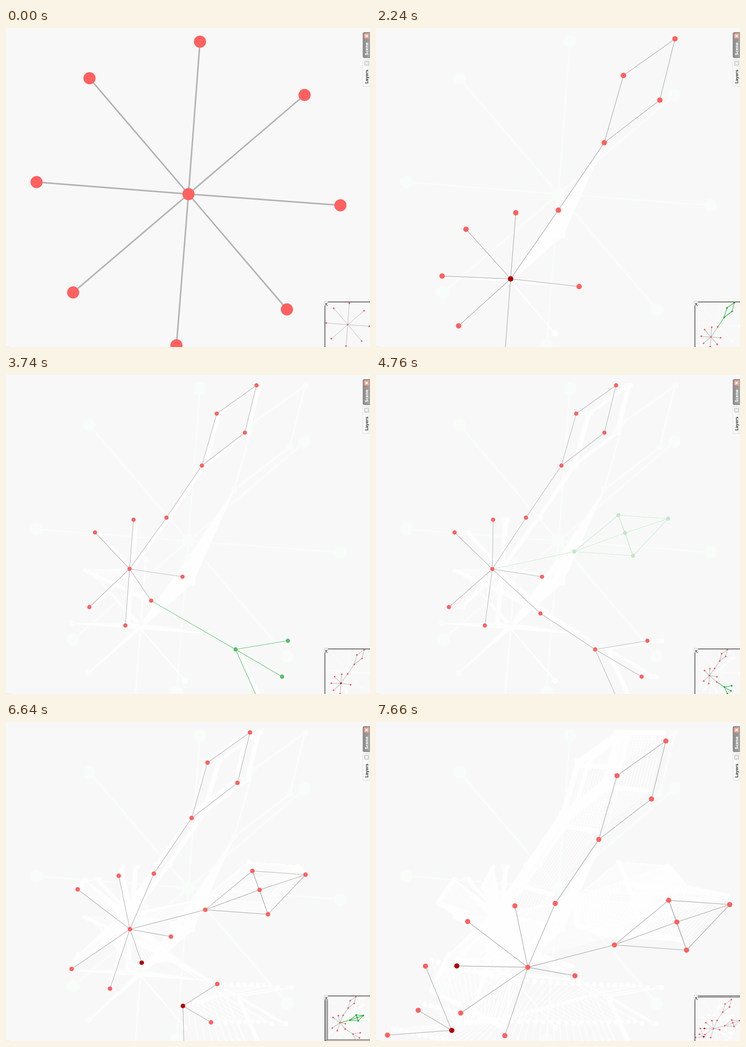
Animation, 799 px wide and 701 px high, one loop 8380 ms. Source, as an HTML page with a canvas:

```html
<!DOCTYPE html>
<html lang="en">
<head>
<meta charset="utf-8">
<title>Graph rewriting</title>
<style>
  html, body { margin: 0; width: 100%; height: 100%; overflow: hidden; background: #f8f8f8; }
  canvas { position: absolute; left: 0; top: 0; }
  .tab {
    position: absolute; left: 783px; width: 16px; box-sizing: border-box;
    border: 1px solid #ddd; border-right: 0; border-radius: 4px 0 0 4px;
    background: linear-gradient(90deg, #fff, #f0f0f0);
    font: bold 8.3px "DejaVu Sans", sans-serif; color: #444;
  }
  .tab.on { border-color: #8a8a8a; background: linear-gradient(90deg, #8c8c8c, #a4a4a4); color: #fff; }
  .tab span {
    position: absolute; left: 8px; white-space: nowrap; line-height: 10px;
    transform: translate(-50%, -50%) rotate(-90deg);
  }
  .tab svg { position: absolute; left: 2px; top: 2px; }
</style>
</head>
<body>
<canvas id="stage" width="799" height="701"></canvas>
<div class="tab on" style="top:9px;height:57px">
  <svg width="11" height="11"><rect width="11" height="11" rx="2" fill="#f2a08a"/><path d="M3 3l5 5M8 3l-5 5" stroke="#fff" stroke-width="1.8"/></svg>
  <span style="top:36px">Scene</span>
</div>
<div class="tab" style="top:69px;height:60px">
  <svg width="11" height="11"><rect width="11" height="11" rx="2" fill="#d4d4d4"/><path d="M3 3l5 5M8 3l-5 5" stroke="#fff" stroke-width="1.8"/></svg>
  <span style="top:37px">Layers</span>
</div>
<script>
const LOOP = 8380, W = 799, H = 701;
const BG = [248, 248, 248], GREEN = [17, 170, 42];
const RED = '#ff6060', DARK = '#b00000', GREY = '#b2b2b2', WHITE = '#fefefe', MINT = '#f8fdf9';

// Rewrite stages: time span, steps, camera keys [progress, scale, x, y], highlighted nodes.
const stages = [
  { from: 0, to: 0, steps: 1, view: [[0, 2.87, 856.3, -311.5]], dark: '' },
  { from: 460, to: 1320, steps: 24, view: [[0, 1.294, 501, 252]], dark: '' },
  { from: 1800, to: 2700, steps: 22, view: [[0, 1.294, 501, 252]], dark: 'c' },
  { from: 3020, to: 4060, steps: 28, view: [[0, 1, 440, 199], [.68, 1, 430, 199]], dark: '' },
  { from: 4440, to: 6000, steps: 36, view: [[0, 1, 407, 199]], dark: '' },
  { from: 6300, to: 7660, steps: 33, dark: 'l g0',
    view: [[.03, 1, 407, 199], [.273, 1.067, 407.5, 211], [.576, 1.154, 408, 226.5],
           [.6, 1.162, 409, 228], [.97, 1.226, 484, 239.5], [1, 1.227, 489, 258]] }
];

// Node: birth stage, x, y, then where it travels during a given stage.
const nodes = {
  c: { b: 0, at: [-158.8, 235.7], go: { 2: [-158.8, 227], 4: [-127, 229] } },
  u: { b: 0, at: [-150, 119] },
  ul: { b: 0, at: [-234.5, 147] },
  l: { b: 0, at: [-275, 226.5], go: { 3: [-46, 325], 5: [-254, 226.6] } },
  ll: { b: 0, at: [-247, 311] },
  d: { b: 0, at: [-168, 351.5] },
  lr: { b: 0, at: [-83.5, 324], end: 2 },
  r: { b: 0, at: [-42.6, 244.3] },
  k: { b: 0, at: [-70, 159.8], go: { 1: [-77.8, 114.5] } },
  o: { b: 1, at: [0, 0] },
  dl: { b: 1, at: [32.6, -114.2] },
  dt: { b: 1, at: [120, -176.3] },
  dr: { b: 1, at: [94.3, -72.3] },
  g0: { b: 3, at: [74, 404], go: { 5: [-263, 342] } },
  g1: { b: 3, at: [188.7, 385], go: { 5: [-310, 227] } },
  g2: { b: 3, at: [176, 464], go: { 5: [-323, 306] } },
  g3: { b: 3, at: [120, 507], go: { 5: [-378, 350.5] } },
  n0: { b: 4, at: [28, 189] },
  n1: { b: 4, at: [125, 109] },
  n2: { b: 4, at: [234.3, 116.7] },
  n3: { b: 4, at: [139.7, 148] },
  n4: { b: 4, at: [157, 198.3] }
};
const edges = ('c-u c-ul c-l c-ll c-d c-lr c-r c-k k-o o-dl dl-dt dt-dr dr-o l-g0 g0-g1 g0-g2 g0-g3 ' +
  'c-n0 n0-n1 n0-n3 n0-n4 n1-n2 n1-n3 n1-n4 n3-n4 n3-n2 n2-n4').split(' ').map(e => e.split('-'));

const mix = (a, b, p) => a + (b - a) * p;
const fade = p => `rgb(${BG.map((v, i) => Math.round(mix(v, GREEN[i], p)))})`;

function keyed(keys, p) {
  let i = 0;
  while (i < keys.length - 1 && keys[i + 1][0] <= p) i++;
  const a = keys[i], b = keys[i + 1];
  if (!b || p <= a[0]) return a.slice(1);
  const q = (p - a[0]) / (b[0] - a[0]);
  return a.slice(1).map((v, n) => mix(v, b[n + 1], q));
}

function place(node, stage, p) {
  let at = node.at;
  for (const s in node.go || {}) {
    const to = node.go[s];
    if (s < stage) at = to;
    else if (s == stage) at = at.map((v, i) => mix(v, to[i], p));
  }
  return at;
}

// Draws the graph in stage coordinates; tint paints everything in one colour.
function drawGraph(g, stage, p, { tint, radius = 4.64, line = 1.11, green = fade(p) } = {}) {
  const [s, ox, oy] = keyed(stages[stage].view, p);
  const pts = {}, dark = stages[stage].dark.split(' ');
  for (const id in nodes) {
    const n = nodes[id];
    if (n.b > stage || n.end <= stage) continue;
    const [x, y] = place(n, stage, p);
    pts[id] = [ox + x * s, oy + y * s];
  }
  const fresh = b => stage > 0 && b === stage;
  const live = edges
    .filter(([a, b]) => pts[a] && pts[b] && !(stage === 5 && a === 'l'))
    .map(([a, b]) => [pts[a], pts[b], fresh(Math.max(nodes[a].b, nodes[b].b))])
    .sort((a, b) => b[2] - a[2]);
  g.lineWidth = Math.max(1, line * s);
  for (const [a, b, isNew] of live) {
    g.strokeStyle = tint || (isNew ? green : GREY);
    g.beginPath();
    g.moveTo(...a);
    g.lineTo(...b);
    g.stroke();
  }
  for (const id in pts) {
    g.fillStyle = tint || (fresh(nodes[id].b) ? green : dark.includes(id) ? DARK : RED);
    g.beginPath();
    g.arc(...pts[id], radius * s, 0, 7);
    g.fill();
  }
}

// The overview shows the result of the last finished stage.
function drawMap(g, stage, opts) {
  const [k, x, y] = stage === 5 ? [.129, 698, 604.4] : [.1413, 693.5, 600.4];
  const s = keyed(stages[stage].view, 1)[0];
  g.save();
  g.beginPath();
  g.rect(701, 603, 98, 98);
  g.clip();
  g.translate(x, y);
  g.scale(k, k);
  drawGraph(g, stage, 1, { radius: 1.9 / k / s, line: (stage && stage < 5 ? 1.05 : .9) / k / s, ...opts });
  g.restore();
}

function drawFrame(g, stage, p) {
  g.fillStyle = '#6c6c6c';
  g.fillRect(700, 601, 99, 2);
  g.fillRect(699, 602, 2, 99);
  if (stage === 5 && p < 1) {
    const [w, h] = keyed([[0, 0, 0], [.273, 5, 3], [.576, 16, 13], [.62, 17, 14], [1, 2, 18]], p);
    const x = 701 + w, y = 701 - h;
    g.fillStyle = '#bdbdbd';
    g.fillRect(701, 603, w, 98);
    g.fillRect(701, y, 98, h);
    g.strokeStyle = '#555';
    g.lineWidth = 1;
    g.beginPath();
    g.moveTo(x, 603);
    g.lineTo(x, y);
    g.lineTo(W, y);
    g.moveTo(x, y);
    g.lineTo(701, 700);
    g.stroke();
  } else if (stage === 5) {
    g.fillRect(706, 604, 93, 1.5);
  }
  g.fillStyle = '#fafafa';
  g.fillRect(699, 601, 8, 10);
  g.strokeStyle = '#ccc';
  g.lineWidth = 1;
  g.strokeRect(698.5, 600.5, 8, 10);
  g.fillStyle = '#222';
  g.font = '11px "DejaVu Sans", sans-serif';
  g.fillText('x', 699.5, 609.5);
}

// Every pose in order; the earlier ones remain as pale trails.
const poses = stages.flatMap((s, stage) =>
  Array.from({ length: s.steps }, (_, i) => ({ stage, p: (i + 1) / s.steps })));

function poseAt(t) {
  let i = 0, before = 0;
  while (i < stages.length - 1 && stages[i + 1].from <= t) before += stages[i++].steps;
  const { from, to, steps } = stages[i];
  const u = to > from ? Math.min(1, (t - from) / (to - from)) : 1;
  return before + Math.round(u * (steps - 1));
}

const ctx = document.getElementById('stage').getContext('2d');
const trail = document.createElement('canvas');
trail.width = W;
trail.height = H;
const tg = trail.getContext('2d');
let traced = 0;

function trace(n) {
  if (n < traced) {
    tg.clearRect(0, 0, W, H);
    traced = 0;
  }
  for (; traced < n; traced++) {
    const { stage, p } = poses[traced];
    const jump = p === 1 && [0, 2, 3].includes(stage);
    drawGraph(tg, stage, p, { tint: jump ? MINT : WHITE, radius: 4.8, line: 1.4 });
  }
}

function draw(t) {
  const n = poseAt(t), { stage, p } = poses[n];
  const done = p === 1 ? stage : stage - 1;
  trace(n);
  ctx.fillStyle = '#f8f8f8';
  ctx.fillRect(0, 0, W, H);
  ctx.fillStyle = '#e4e4e4';
  ctx.fillRect(0, 700, 8, 1);
  ctx.drawImage(trail, 0, 0);
  drawGraph(ctx, stage, p);
  ctx.fillStyle = '#f8f8f8';
  ctx.fillRect(699, 601, 100, 100);
  for (let i = 0; i < done; i++) drawMap(ctx, i, { tint: WHITE });
  drawMap(ctx, done);
  drawFrame(ctx, stage, p);
}

const start = performance.now();
function tick() {
  draw((performance.now() - start) % LOOP);
  requestAnimationFrame(tick);
}
tick();
</script>
</body>
</html>
```
